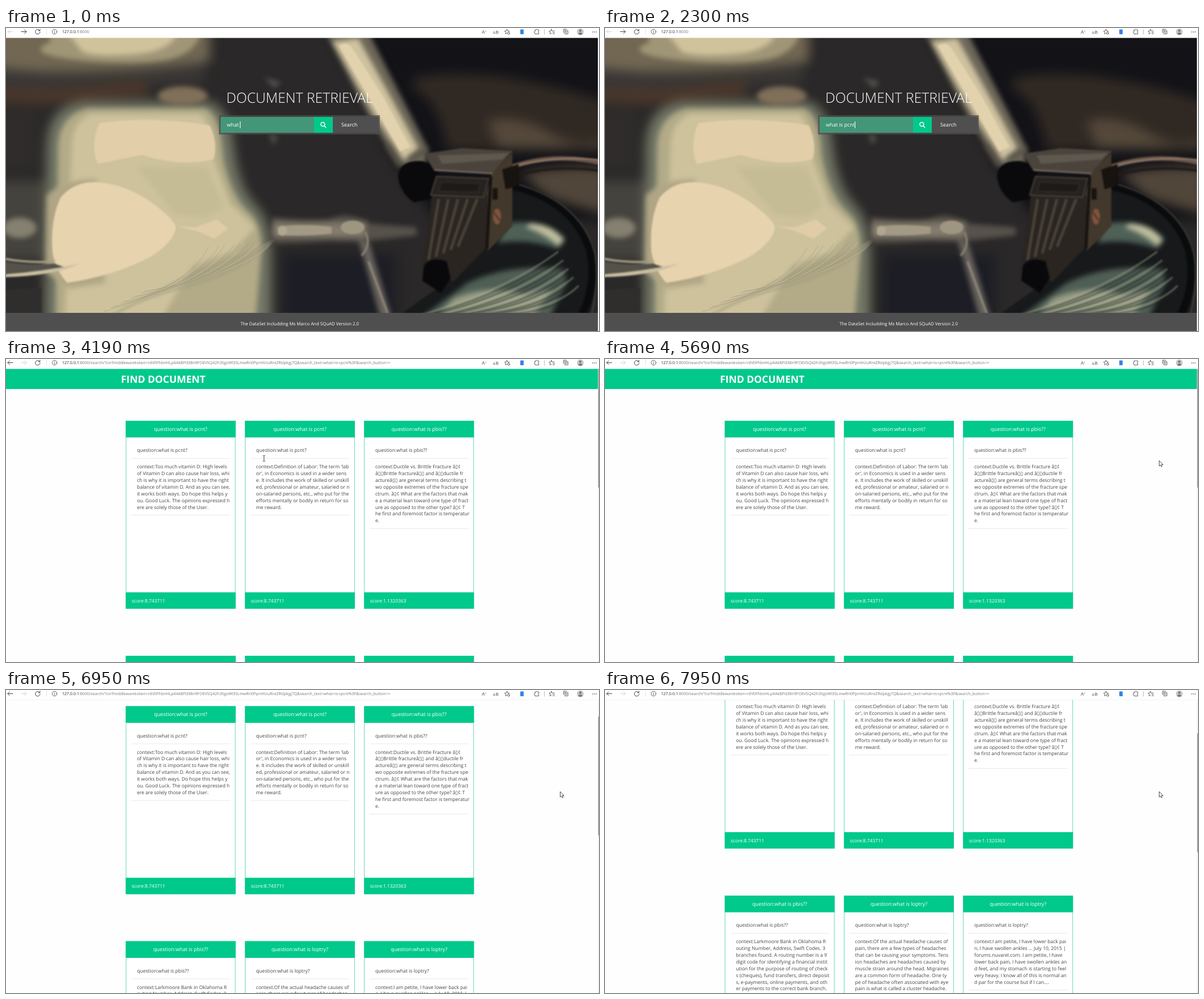
These frames come from a looping animation (1047x535 px, 8 s). An HTML page:

```html
<!DOCTYPE html>
<html lang="en">
<head>
<meta charset="utf-8">
<title>Document retrieval</title>
<style>
  html, body { margin: 0; width: 100%; height: 100%; overflow: hidden; background: #fff; }
  svg { display: block; width: 100%; height: 100%; }
  text { font-family: "Open Sans", "Noto Sans", "DejaVu Sans", sans-serif; text-rendering: geometricPrecision; white-space: pre; }
  filter { color-interpolation-filters: sRGB; }
  .mid { text-anchor: middle; }
  .white { fill: #fff; }
  .green { fill: #00c98b; }
  .icon { fill: none; stroke: #4a4a4a; stroke-width: .85; stroke-linecap: round; stroke-linejoin: round; }
  .haze { filter: url(#haze); }
  .soft { filter: url(#soft); }
  .edge { filter: url(#edge); }
</style>
</head>
<body>
<svg viewBox="0 0 1047 535" preserveAspectRatio="none">
  <defs>
    <clipPath id="view"><rect y="17" width="1045" height="486"/></clipPath>
    <filter id="haze" filterUnits="userSpaceOnUse" x="-60" y="-40" width="1170" height="640"><feGaussianBlur stdDeviation="10"/></filter>
    <filter id="soft" filterUnits="userSpaceOnUse" x="-60" y="-40" width="1170" height="640"><feGaussianBlur stdDeviation="5"/></filter>
    <filter id="edge" filterUnits="userSpaceOnUse" x="-60" y="-40" width="1170" height="640"><feGaussianBlur stdDeviation="1.5"/></filter>
    <linearGradient id="tube" x1="0" y1="0" x2="0" y2="1">
      <stop offset="0" stop-color="#34312f"/><stop offset=".35" stop-color="#7d7668"/>
      <stop offset=".6" stop-color="#8a8272"/><stop offset="1" stop-color="#302d2c"/>
    </linearGradient>
  </defs>

  <g id="home">
    <rect y="17" width="1047" height="518" fill="#f4f4f4"/>
    <g clip-path="url(#view)">
      <rect width="1047" height="535" fill="#2a2828"/>

      <!-- far background -->
      <g class="haze">
        <path d="M560 -20H1070V340H760L690 240Z" fill="#121217"/>
        <path d="M720 88Q850 62 1060 130V215H780Q760 120 720 110Z" fill="#302923"/>
        <path d="M850 165Q900 150 960 185T1050 195V212H870Z" fill="#55483a"/>
        <path d="M-20 -20H360V60Q200 85 -20 75Z" fill="#716753"/>
        <path d="M-20 70Q180 92 350 64V100L-20 108Z" fill="#393634"/>
        <path d="M-20 106H110L250 92V120L70 135 -20 132Z" fill="#4a372b"/>
        <path d="M-30 145H55V250H-30Z" fill="#2f2c2b"/>
        <path d="M-30 270H80V410H-30Z" fill="#45433d"/>
        <path d="M490 400H690V530H490Z" fill="#1d1e25"/>
        <path d="M910 258Q980 240 1060 248V330L960 300Z" fill="#51463a"/>
        <path d="M72 215Q72 136 140 130H360Q396 145 402 215 412 285 440 312 466 340 468 390V540H68Z" fill="#767a68"/>
      </g>
      <g class="soft">
        <path d="M78 0H345Q340 50 270 58T115 55 78 25Z" fill="#a09677"/>
        <path d="M102 0H305Q298 40 230 46T135 42Z" fill="#d0c39c"/>
        <ellipse cx="312" cy="120" rx="44" ry="17" fill="#806f59"/>
        <ellipse cx="24" cy="353" rx="30" ry="18" fill="#85806f"/>
        <path d="M455 87l30 8-10 12zM464 185l16 8-8 14z" fill="#55524f"/>
      </g>

      <!-- blurred chrome body -->
      <g class="soft">
        <path d="M92 215Q92 155 145 142H350Q378 152 382 225 394 290 424 322 454 345 450 400L440 520H88Z" fill="#b3ab88"/>
        <path d="M116 215Q114 165 152 152H342Q364 165 368 235L396 310 440 352 400 395 330 420 270 520H104Z" fill="#cdc29c"/>
        <path d="M230 245H355L385 315 355 335 300 330Z" fill="#c5bb95"/>
      </g>
      <g class="edge">
        <path d="M165 168Q260 155 360 172Q375 205 366 232 310 246 240 224L162 240Q148 205 165 168Z" fill="#e2cfaa"/>
        <path d="M300 350L335 352 372 338 392 354 368 372 335 358Z" fill="#e0cda8"/>
      </g>
      <path class="soft" d="M72 295Q110 264 160 268L175 450 110 460 70 430Z" fill="#b0a685"/>
      <path class="edge" d="M96 300Q120 270 160 272 220 277 270 318 300 342 300 354 294 380 255 404 190 438 108 450 86 425 82 395 78 340 96 300Z" fill="#e8d3af"/>

      <!-- record on the left -->
      <g class="edge">
        <path d="M-5 412Q40 420 85 416L108 424Q60 434 -5 434Z" fill="#55524a"/>
        <path d="M-5 435Q60 431 130 416 85 438 -5 440Z" fill="#c9bfa2"/>
        <path d="M-5 405Q45 414 90 410L70 415Q30 416 -5 409Z" fill="#a49b84"/>
        <path d="M-5 462L62 458V510H-5Z" fill="#302e2d"/>
        <path d="M474 372Q440 430 300 465 240 480 190 510H175Q260 465 330 430 420 400 474 372Z" fill="#a59d80" opacity=".45"/>
      </g>
      <g id="grooves" fill="none"></g>

      <!-- spindle -->
      <g class="soft">
        <path d="M470 334Q520 342 570 338L600 328 640 342V378L570 376 470 384Z" fill="url(#tube)"/>
        <path d="M635 345L725 352V366L635 376Z" fill="#57524c"/>
        <path d="M622 372L642 382 682 515H662Z" fill="#68635d"/>
      </g>
      <g class="edge">
        <path d="M480 351Q520 345 575 351V363Q520 369 480 365Z" fill="#a39a85"/>
        <ellipse cx="488" cy="358" rx="8" ry="9" fill="#b0a791"/>
        <ellipse cx="612" cy="352" rx="21" ry="12" fill="#9f9682"/>
        <path d="M634 360Q646 382 628 402" fill="none" stroke="#857d6f" stroke-width="4"/>
        <path d="M640 412L674 505" stroke="#8b8477" stroke-width="4"/>
      </g>

      <!-- tone arm -->
      <g class="soft">
        <path d="M560 0H636L692 110 746 215 738 250 692 242 640 155Z" fill="#6d6759"/>
        <path d="M576 24L622 18 674 112 728 212 702 234 642 140Z" fill="#cfc29f"/>
      </g>
      <path class="edge" d="M588 32Q602 22 612 36L664 118 714 210 696 218 640 122Z" fill="#e2d2ad"/>
      <path class="soft" d="M672 205L698 246M712 232L744 214" stroke="#4f4942" stroke-width="6"/>

      <!-- record on the right -->
      <g class="edge">
        <path d="M880 285Q990 300 1036 385 1050 440 1030 510H690L790 440Z" fill="#17191b"/>
      </g>
      <g class="soft">
        <path d="M885 345Q950 335 988 372L975 390Q920 370 868 380Z" fill="#4f6157"/>
        <path d="M925 345Q965 345 985 375L975 385Q950 362 918 352Z" fill="#c0bf9f"/>
        <path d="M815 450Q890 415 985 425L990 450 960 510H735Z" fill="#505f55"/>
        <path d="M790 478Q850 452 915 470L965 462 930 510H760Z" fill="#9a9f86"/>
      </g>
      <g id="rings" class="edge" fill="none"></g>
      <g class="edge" fill="none">
        <path d="M895 278Q1000 305 1030 390 1045 450 1015 510" stroke="#0a0b0d" stroke-width="13"/>
        <path d="M905 276Q1018 310 1040 400 1048 455 1032 510" stroke="#45433b" stroke-width="2"/>
        <path d="M880 250Q960 218 1050 238" stroke="#6b5548" stroke-width="8"/>
        <path d="M890 246Q965 224 1050 233" stroke="#a08a74" stroke-width="2"/>
        <path d="M895 263Q960 240 1050 252" stroke="#211b18" stroke-width="4"/>
      </g>

      <!-- cartridge -->
      <g class="edge">
        <path d="M692 262Q695 232 735 235L765 245 758 300 720 308Q695 290 692 262Z" fill="#0a0a0d"/>
        <path d="M738 222L805 212 895 217 858 257 756 252Z" fill="#4a443d"/>
        <path d="M762 225L888 221 876 232 770 240Z" fill="#5f584e"/>
        <path d="M858 256L894 220V350L850 394 845 300Z" fill="#43382c"/>
        <path d="M876 250L905 240V278L882 285Z" fill="#17130f"/>
        <path d="M752 295H850L850 386 790 448 735 425Z" fill="#2a2521"/>
        <path d="M757 251L859 257" stroke="#8d806d" stroke-width="2"/>
        <path d="M760 262L852 266 843 299 750 295Z" fill="#26221f" stroke="#4a443b" stroke-width="2"/>
        <path d="M768 272L838 275 833 290 764 288Z" fill="#1d1a18" stroke="#3c3630"/>
        <path d="M856 262L849 390" stroke="#15120f" stroke-width="5"/>
      </g>
      <g id="ribs" class="edge" fill="none" stroke="#4a4239" stroke-width="5"></g>
      <g class="edge">
        <ellipse cx="867" cy="333" rx="7" ry="14" fill="#80543c"/>
        <path d="M862 326L872 340" stroke="#422a20" stroke-width="2"/>
        <path d="M859 283h9v20h-9z" fill="#17130f"/>
        <path d="M738 420Q748 402 778 412L785 442 768 468 735 446Z" fill="#09090b"/>
      </g>
    </g>

    <rect y="503" width="1045" height="32" fill="#4f4f4f"/>
    <text class="mid white" x="518.5" y="525" font-size="7.83">The DataSet Includding Ms Marco And SQuAD Version 2.0</text>
    <text class="white" x="389" y="132.3" font-size="24.75" font-weight="300">DOCUMENT RETRIEVAL</text>
    <rect x="376" y="154" width="284" height="34" fill="#4f4f4f" opacity=".75"/>
    <rect x="379" y="157" width="165" height="28" fill="#449678"/>
    <rect class="green" x="544" y="157" width="33" height="28"/>
    <rect x="577" y="157" width="81" height="28" fill="#504f50"/>
    <g fill="none" stroke="#fff" stroke-width="1.5"><circle cx="559.3" cy="170" r="3.5"/><path d="M561.8 172.6L565 176"/></g>
    <text class="white" x="592" y="174.3" font-size="9.1">Search</text>
    <text id="query" class="white" x="390" y="174.3" font-size="9.1"></text>
    <rect id="caret" class="white" y="165" width="1" height="12"/>
  </g>

  <g id="results">
    <rect y="17" width="1047" height="518" fill="#fefefe"/>
    <g id="page">
      <rect class="green" y="17" width="1045" height="36"/>
      <text class="white" x="203" y="41.5" font-size="17.5" font-weight="700">FIND DOCUMENT</text>
    </g>
    <rect x="1045" y="17" width="2" height="518" fill="#f3f3f3"/>
    <rect id="thumb" x="1045.7" width="1.3" height="210" fill="#8b8b8b"/>
  </g>

  <!-- browser bar -->
  <rect width="1047" height="17" fill="#fff"/>
  <rect y="17" width="1047" height=".6" fill="#ececec"/>
  <g class="icon">
    <path id="back" d="M12 6.5H3M6.5 3L3 6.5 6.5 10"/>
    <path id="next" d="M27 6.5H36M32.5 3L36 6.5 32.5 10"/>
    <path id="reload" stroke="#222" d="M59.4 4.3A4.2 4.2 0 1 0 60.2 7M60 2.2V4.8H57.4"/>
    <path id="stop" stroke="#222" d="M52.8 3.3L59.2 9.7M59.2 3.3L52.8 9.7"/>
    <path stroke="#ddd" d="M71.5 2V11"/>
    <circle cx="85.7" cy="6.5" r="4.2"/><path d="M85.7 6V8.8M85.7 4.2V4.3"/>
    <path d="M884.5 2.3l1.3 2.8 3 .3-2.2 2 .6 3-2.7-1.5-2.7 1.5.6-3-2.2-2 3-.3z"/>
    <circle cx="887.5" cy="9.3" r="1.9" fill="#fff"/>
    <path d="M934 3.6h2a1.4 1.4 0 0 1 2.8 0h2v2.2a1.3 1.3 0 0 0 0 2.6v2.2h-6.8v-2a1.4 1.4 0 0 1 0-2.8z"/>
    <path stroke="#aaa" d="M950.5 3V11"/>
    <path d="M963 2.4l1.2 2.7h4M963 2.4l-1.2 2.7-3 .4 2.2 2-.5 3 2.5-1.4M965.5 7.6h3M965.5 10h3"/>
    <rect x="984.2" y="2.2" width="6" height="6" rx="1"/><path d="M992.2 4.5V10.4H986.3M987.2 3.8V6.6M985.8 5.2H988.6"/>
  </g>
  <text x="840" y="10" font-size="8.5" fill="#555">A</text><text x="845.5" y="6.5" font-size="5" fill="#555">»</text>
  <text x="859.5" y="9.5" font-size="7" fill="#555" style="font-family:'Open Sans','Noto Sans CJK JP',sans-serif">aあ</text>
  <rect x="908" y="2.5" width="6" height="8.5" rx="1" fill="#3285e4"/>
  <circle cx="1014" cy="6.7" r="6" fill="#c9c7c5"/>
  <circle cx="1014" cy="4.8" r="2.1" fill="#777"/><path d="M1010 10.3q4-5 8 0-4 3.6-8 0z" fill="#777"/>
  <g fill="#333"><circle cx="1036" cy="7" r=".8"/><circle cx="1039" cy="7" r=".8"/><circle cx="1042" cy="7" r=".8"/></g>
  <text x="99" y="9.2" font-size="7.09" fill="#777"><tspan fill="#222">127.0.0.1</tspan>:8000<tspan id="path"></tspan></text>

  <path id="arrow" d="M0 0V9.6L2.3 7.5 3.8 10.9 5.3 10.2 3.9 7H6.8Z" fill="#fff" stroke="#222" stroke-width=".8"/>
  <path id="beam" d="M-2 .5H-.6L0 1 .6 .5H2M0 1V10M-2 10.5H-.6L0 10 .6 10.5H2" fill="none" stroke="#333" stroke-width=".9"/>
</svg>

<script>
const $ = id => document.getElementById(id);
const LOOP = 8000, LOADED = 4190;
const QUERY = "what is pcnt?";
const URL_PATH = "/search/?csrfmiddlewaretoken=rdV0FhbnHLp4AkBPd38n9FOEVSQ42h35gsWl3SLmwRn0PpmhUuRreZRslpkgj7Q&search_text=what+is+pcnt%3F&search_button=+";

function add(parent, tag, attrs, text) {
  const el = document.createElementNS("http://www.w3.org/2000/svg", tag);
  for (const key in attrs) el.setAttribute(key, attrs[key]);
  if (text) el.textContent = text;
  parent.append(el);
}

// question, score, context lines
const cards = [
  ["pcnt?", "8.743711", `context:Too much vitamin D: High levels
of Vitamin D can also cause hair loss, whi
ch is why it is important to have the right
balance of vitamin D. And as you can see,
it works both ways. Do hope this helps y
ou. Good Luck. The opinions expressed h
ere are solely those of the User.`],
  ["pcnt?", "8.743711", `context:Definition of Labor: The term 'lab
or', in Economics is used in a wider sens
e. It includes the work of skilled or unskill
ed, professional or amateur, salaried or n
on-salaried persons, etc., who put for the
efforts mentally or bodily in return for so
me reward.`],
  ["pbis??", "1.1320363", `context:Ductile vs. Brittle Fracture â▯¢
â▯▯Brittle fractureâ▯▯ and â▯▯ductile fr
actureâ▯▯ are general terms describing t
wo opposite extremes of the fracture spe
ctrum. â▯¢ What are the factors that mak
e a material lean toward one type of fract
ure as opposed to the other type? â▯¢ T
he first and foremost factor is temperatur
e.`],
  ["pbis??", "", `context:Larkmoore Bank in Oklahoma R
outing Number, Address, Swift Codes. 3
branches found. A routing number is a 9
digit code for identifying a financial instit
ution for the purpose of routing of check
s (cheques), fund transfers, direct deposit
s, e-payments, online payments, and oth
er payments to the correct bank branch.`],
  ["loptry?", "", `context:Of the actual headache causes of
pain, there are a few types of headaches
that can be causing your symptoms. Tens
ion headaches are headaches caused by
muscle strain around the head. Migraines
are a common form of headache. One ty
pe of headache often associated with eye
pain is what is called a cluster headache.`],
  ["loptry?", "", `context:I am petite, I have lower back pai
n, I have swollen ankles ... July 10, 2015 |
forums.nuvarel.com. I am petite, I have
lower back pain, I have swollen ankles an
d feet, and my stomach is starting to feel
very heavy. I know all of this is normal an
d par for the course but if I can....`],
];

cards.forEach(([word, score, context], i) => {
  const x = 211.5 + i % 3 * 210.4, y = i < 3 ? 109 : 524;
  const page = $("page"), lines = context.split("\n"), question = "question:what is " + word;
  const put = (dx, dy, size, fill, text, cls = "") =>
    add(page, "text", { x: x + dx, y: y + dy, "font-size": size, fill, class: cls }, text);
  const rule = dy => add(page, "rect", { x: x + 9.5, y: y + dy, width: 175, height: 1, fill: "#e9e9e9" });
  add(page, "rect", { x: x + .4, y: y + .5, width: 193, height: 331, fill: "#fff", stroke: "#52d3ab", "stroke-width": .9 });
  for (const [dy, height] of [[0, 29.5], [303, 29]])
    add(page, "rect", { x, y: y + dy, width: 194, height, class: "green" });
  put(97, 17.8, 9.05, "#fff", question, "mid");
  put(19.7, 55, 8.57, "#444", question);
  rule(66);
  lines.forEach((line, n) => put(19.7, 84 + n * 11.92, 8.57, "#444", line));
  rule(82.7 + lines.length * 11.92);
  if (score) put(10.5, 320.5, 8.4, "#fff", "score:" + score);
});

// record grooves and cartridge ribs
for (let i = 0; i < 14; i++) {
  add($("grooves"), "path", {
    d: `M${475 - i * 9} ${374 + i}Q${425 - i * 8} ${432 + i * 2} ${250 - i * 6} ${462 + i * 3}`,
    stroke: i % 3 ? "#8b846d" : "#ddd2b0", "stroke-width": .9, opacity: .4,
  });
  add($("rings"), "path", {
    d: `M${735 + i * 10} 506Q${880 + i * 7} ${465 + i * 3} ${975 + i * 3} ${395 + i * 5}`,
    stroke: i % 3 ? "#1a2221" : "#a9ad93", "stroke-width": 2.5, opacity: .55,
  });
}
for (let i = 0; i < 5; i++)
  add($("ribs"), "path", { d: `M${764 + i * 17} 302L${746 + i * 13} ${410 - i * 6}` });

// [time, ...values], each held until the next
const typing = [[0, 5, 413], [540, 6, 416], [660, 7, 419], [910, 8, 422], [1430, 8, 0],
  [1680, 9, 427], [1800, 10, 432], [2050, 11, 438], [2300, 12, 441], [2800, 12, 0],
  [3300, 13, 445], [3800, 13, 0]];
const pointer = [[0, "", 0, 0], [4050, "arrow", 454.5, 174.5], [4190, "beam", 455.5, 170],
  [5190, "arrow", 640, 163], [5310, "arrow", 849.5, 153.5], [5450, "arrow", 935, 168],
  [5570, "arrow", 981, 178], [5690, "arrow", 978.5, 179.5]];
const scroll = [[0, 0], [6830, 68], [6950, 80.5], [7710, 123], [7830, 151], [7950, 161]];

const at = (steps, t) => steps.filter(s => s[0] <= t).pop();
const show = (id, on) => $(id).setAttribute("display", on ? "inline" : "none");

function render(t) {
  const loaded = t >= LOADED, loading = t >= 4050 && !loaded;
  const [, count, caret] = at(typing, t), [, kind, x, y] = at(pointer, t), [, top] = at(scroll, t);
  show("home", !loaded);
  show("results", loaded);
  show("stop", loading);
  show("reload", !loading);
  $("back").setAttribute("stroke", loaded ? "#222" : "#ccc");
  $("next").setAttribute("stroke", loaded ? "#ccc" : "#222");
  $("path").textContent = loaded ? URL_PATH : "";
  $("query").textContent = QUERY.slice(0, count);
  $("caret").setAttribute("x", caret);
  show("caret", caret);
  for (const id of ["arrow", "beam"]) {
    show(id, id === kind);
    $(id).setAttribute("transform", `translate(${x} ${y})`);
  }
  $("page").setAttribute("transform", `translate(0 ${-top})`);
  $("thumb").setAttribute("y", 17 + top * .37);
}

const times = [...typing, ...pointer, ...scroll].map(s => s[0]);
let last = -1;
function tick() {
  const t = performance.now() % LOOP;
  const step = Math.max(...times.filter(s => s <= t));
  if (step !== last) render(last = step);
  requestAnimationFrame(tick);
}
tick();
</script>
</body>
</html>
```
